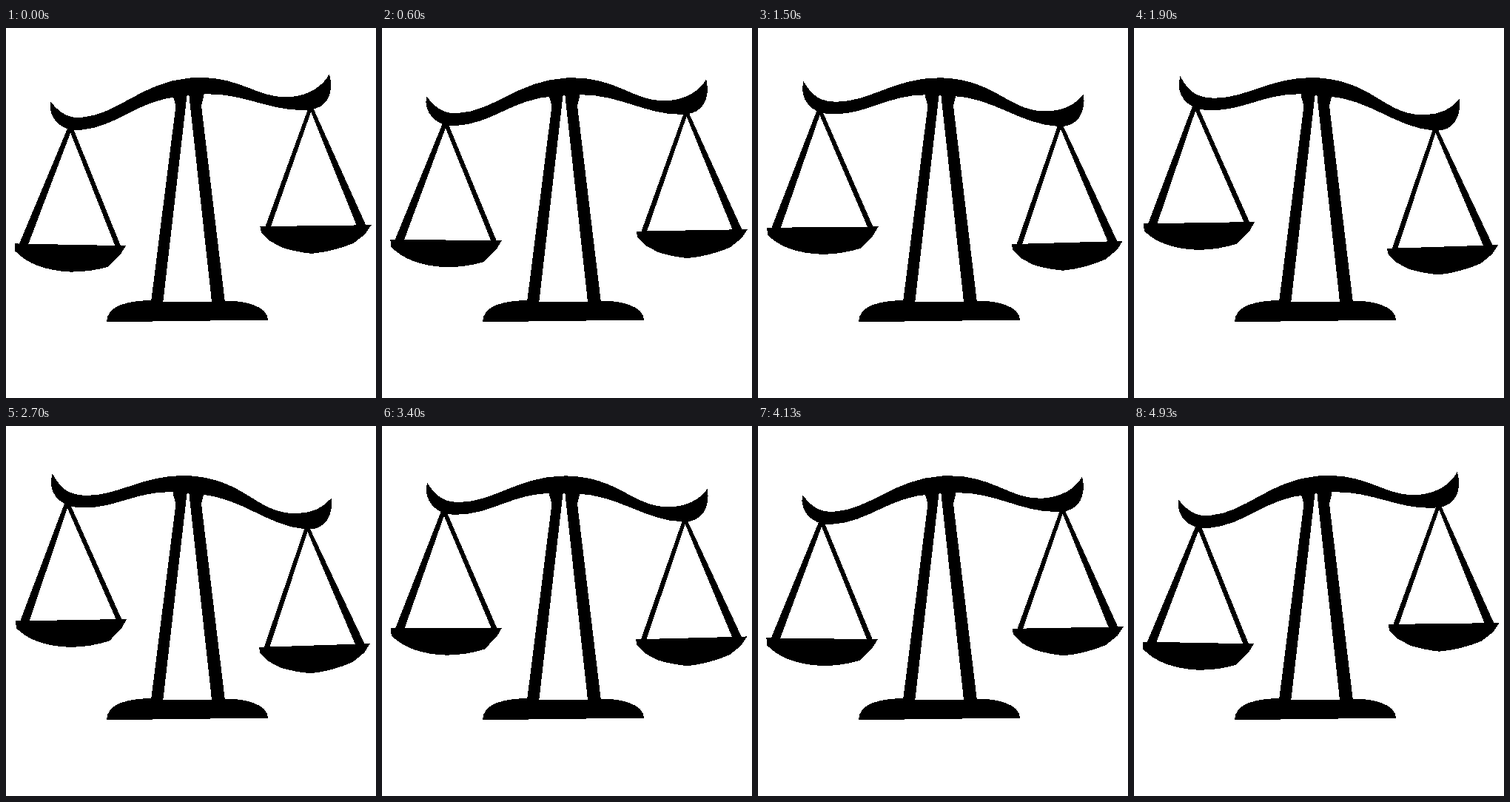
Write an HTML page that moves like this. It is 500 by 500 pixels and loops after 5.01 s.

```html
<!DOCTYPE html>
<html lang="en">
<head>
<meta charset="utf-8">
<title>Balance scales</title>
<style>
  html, body { margin: 0; width: 100%; height: 100%; overflow: hidden; background: #fff; }
  svg { display: block; width: 100%; height: 100%; }
</style>
</head>
<body>
<svg viewBox="0 0 500 500" shape-rendering="crispEdges">
  <!-- stand -->
  <path d="M226 85V93L229.5 105L196.3 368C165 368.5 136 375 136 397.3L354.3 394.5C353 376 325 368.5 295.7 368.5L264 105L267 93V85H246.7L278 370H212.3L245.3 85Z"/>
  <g id="beam">
    <path d="M60.5 81C69 93 79 107 102 106.5C150 107 185 67.5 250 67.5C318 67.5 339 106 385 106C410 106 429 96 439.5 80C444 107 432 126 408 125.7C355 125.5 320 91 260 91H236C175 91 150 123.5 97 123.5C74 123.5 55 106 60.5 81Z"/>
    <g id="left">
      <path d="M80.5 119L17.5 278H30L86 121Z"/>
      <path d="M81.5 119L147.7 278H155.3L87.5 119Z"/>
      <path d="M11.5 277H162L154.5 289.5L138 306Q113 313.7 87 313.7Q37 312 12.5 287Z"/>
    </g>
    <g id="right">
      <path d="M407 123L350 285H357.5L412 124Z"/>
      <path d="M408 123L474 283H487L413 123Z"/>
      <path d="M343.2 284.3L493.5 280.8L485.5 293L470 305.5Q442 317.5 413 320.3Q393 318.5 373 312.5L356 303.5L345 292.5Z"/>
    </g>
  </g>
</svg>
<script>
  const LOOP = 5010, POSES = 100, SWING = 5.6;
  const byId = id => document.getElementById(id);
  const beam = byId('beam'), left = byId('left'), right = byId('right');
  const turn = (el, deg, x, y) => el.setAttribute('transform', `rotate(${deg} ${x} ${y})`);

  // Poses alternate between 30 ms and 70 ms.
  const poseAt = t => Math.min(POSES - 1, 2 * Math.floor(t / 100) + (t % 100 >= 30 ? 1 : 0));

  function draw(now) {
    const tilt = Math.cos(2 * Math.PI * (poseAt(now % LOOP) + 3) / POSES);
    turn(beam, -SWING * tilt, 250, 97);
    // Pans undo the beam's turn and sway slightly the other way.
    turn(left, (SWING + 1.1) * tilt, 84, 120);
    turn(right, (SWING + 0.6) * tilt, 410, 124);
  }

  const start = performance.now();
  function tick() {
    draw(performance.now() - start);
    requestAnimationFrame(tick);
  }
  tick();
</script>
</body>
</html>
```
